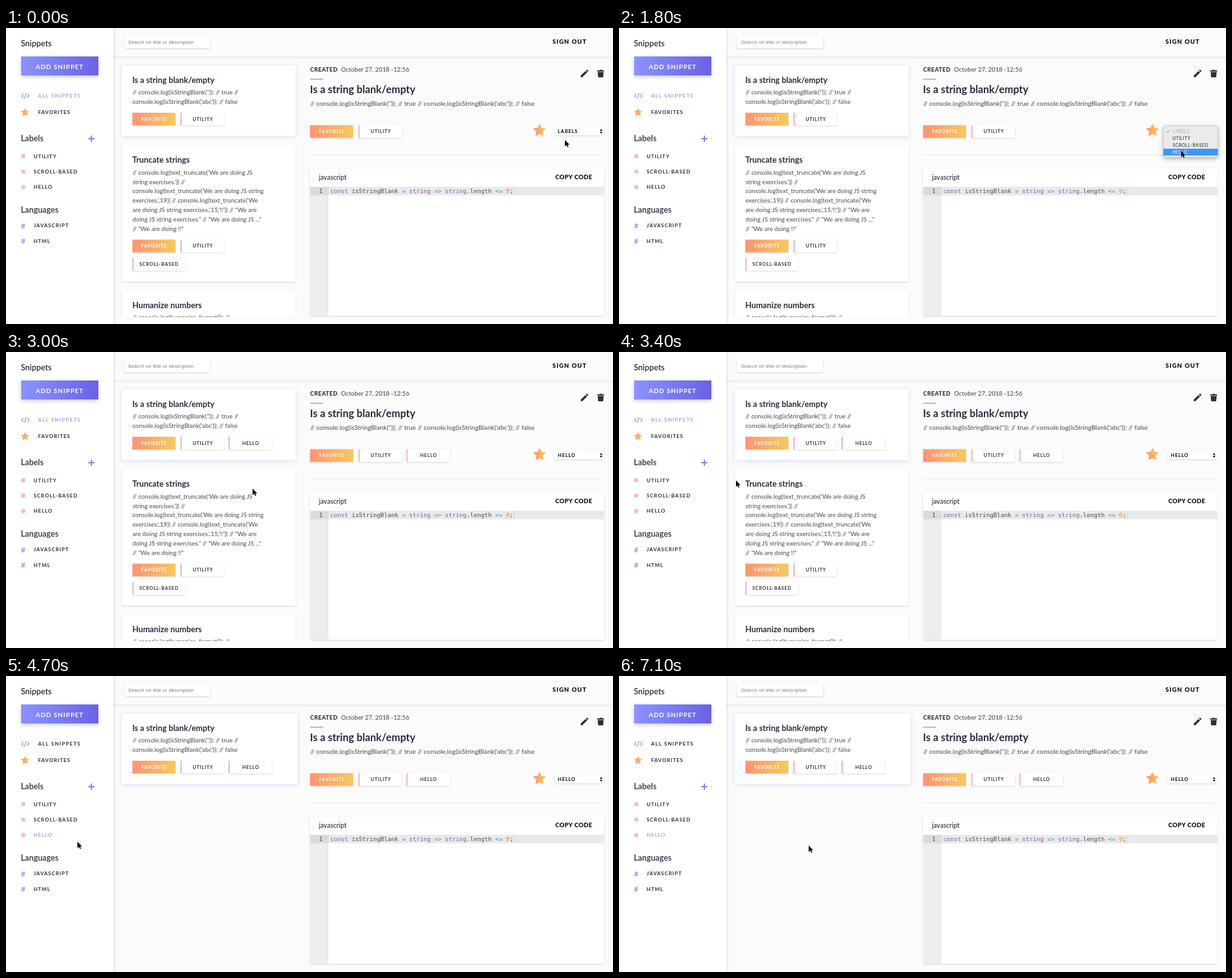
Write an HTML page that moves like this. It is 960 px wide and 468 px high and loops after 7200 ms.

```html
<!DOCTYPE html>
<html lang="en">
<head>
<meta charset="utf-8">
<title>Snippets</title>
<style>
html, body { margin: 0; width: 100%; height: 100%; overflow: hidden; background: #fbfbfb; }
svg { display: block; width: 100%; height: 100%; }
text { font-family: Lato, sans-serif; fill: #2c2b3f; white-space: pre; }

.head { font-size: 12.8px; font-weight: 600; }
.nav { font-size: 8px; font-weight: 700; letter-spacing: 1px; }
.nav.wide { letter-spacing: 1.3px; }
.hash { font-size: 12px; font-weight: 600; fill: #8d89f0; }
.add { font-size: 10px; font-weight: 700; letter-spacing: 1px; fill: #fff; }
.search { font: 7.6px "Liberation Sans", Arial, sans-serif; letter-spacing: .27px; fill: #757575; }
.act { font-size: 9.7px; font-weight: 800; letter-spacing: 1.05px; fill: #000; }
.copy { letter-spacing: .4px; }
.title { font-size: 12.8px; font-weight: 700; }
.title.big { font-size: 16.4px; }
.body { font-size: 9.75px; fill: #4a4a4f; }
.body.big { font-size: 10.3px; }
.tag { font-size: 7.1px; font-weight: 700; letter-spacing: .9px; }
.created { font-size: 9px; font-weight: 800; letter-spacing: .5px; }
.date { font-size: 9.8px; fill: #3d3d48; }
.lang { font-size: 10.5px; font-weight: 500; }
.code { font: 9.44px "DejaVu Sans Mono", monospace; fill: #4d4d4c; }
.kw { fill: #8959a8; }
.op { fill: #3e8fb0; }
.num { fill: #f5871f; }
.pick { font-size: 7.4px; font-weight: 700; letter-spacing: 1px; fill: #000; }
.item { font: 7px Inter, sans-serif; letter-spacing: .26px; fill: #222; }
.item.off { fill: #a5a5a5; }
.hot .item { fill: #fff; }
.hot rect { fill: #3d95f5; }
.white { fill: #fff; }

.soft { filter: drop-shadow(0 1px 1.5px rgba(0, 0, 0, .14)); }
.glow { filter: drop-shadow(0 1px 3px rgba(105, 100, 240, .24)); }
.lift { filter: drop-shadow(0 2px 3px rgba(60, 55, 130, .3)); }
.pane { filter: drop-shadow(0 0 2.5px rgba(0, 0, 0, .17)); }
.pop { filter: drop-shadow(0 2px 3px rgba(0, 0, 0, .3)); }

/* 7200 ms loop, redrawn in 100 ms steps */
.all, .mine, .first, .rest, .new, .before, .after, .menu, .row1, .row2, .row3 {
  animation: 7200ms step-end infinite;
}
.all { animation-name: all; }
.mine { animation-name: mine; }
.first { animation-name: widen; }
.rest { animation-name: rest; }
.new { animation-name: tagged; }
.before { animation-name: before; }
.after { animation-name: after; }
.menu { animation-name: menu; }
.row1 { animation-name: row1; }
.row2 { animation-name: row2; }
.row3 { animation-name: row3; }
@keyframes all { 0% { fill: #a29ff0; } 59.72%, 100% { fill: #2c2b3f; } }
@keyframes mine { 0% { fill: #2c2b3f; } 59.72%, 100% { fill: #a29ff0; } }
@keyframes widen { 0% { width: 275px; } 59.72%, 100% { width: 278px; } }
@keyframes rest { 0% { opacity: 1; } 59.72%, 100% { opacity: 0; } }
@keyframes tagged { 0% { opacity: 0; } 37.49%, 100% { opacity: 1; } }
@keyframes before { 0% { opacity: 1; } 36.11%, 100% { opacity: 0; } }
@keyframes after { 0% { opacity: 0; } 36.11%, 100% { opacity: 1; } }
@keyframes menu { 0% { opacity: 0; } 12.49% { opacity: 1; } 34.72% { opacity: .4; } 36.11%, 100% { opacity: 0; } }
@keyframes row1 { 0% { opacity: 0; } 18.05% { opacity: 1; } 20.83%, 100% { opacity: 0; } }
@keyframes row2 { 0% { opacity: 0; } 20.83% { opacity: 1; } 23.61%, 100% { opacity: 0; } }
@keyframes row3 { 0% { opacity: 0; } 23.61%, 100% { opacity: 1; } }

.cursor { animation: roam 7200ms infinite; }
@keyframes roam {
  0% { transform: translate(884px, 177px); animation-timing-function: steps(3); }
  4.16% { transform: translate(884px, 177px); animation-timing-function: steps(5); }
  11.11% { transform: translate(892px, 165px); animation-timing-function: steps(3); }
  15.27% { transform: translate(892px, 165px); animation-timing-function: steps(7); }
  24.99% { transform: translate(889px, 194px); animation-timing-function: steps(5); }
  31.94% { transform: translate(887px, 197px); animation-timing-function: steps(2); }
  34.72% { transform: translate(851px, 200px); animation-timing-function: steps(2); }
  37.49% { transform: translate(710px, 212px); animation-timing-function: steps(3); }
  41.66% { transform: translate(390px, 216px); animation-timing-function: steps(4); }
  47.22% { transform: translate(185px, 203px); animation-timing-function: steps(6); }
  55.55% { transform: translate(63px, 250px); animation-timing-function: steps(3); }
  59.72% { transform: translate(63px, 252px); animation-timing-function: steps(4); }
  65.27% { transform: translate(113px, 262px); animation-timing-function: steps(4); }
  70.83% { transform: translate(235px, 268px); animation-timing-function: steps(4); }
  76.38%, 100% { transform: translate(300px, 268px); }
}
</style>
</head>
<body>
<svg viewBox="0 0 960 468" preserveAspectRatio="none">
  <defs>
    <linearGradient id="violet"><stop stop-color="#8b93ff"/><stop offset="1" stop-color="#6a62e4"/></linearGradient>
    <linearGradient id="sun"><stop stop-color="#ff9376"/><stop offset="1" stop-color="#f6c95c"/></linearGradient>
    <clipPath id="list"><rect x="172" y="46" width="300" height="411"/></clipPath>
    <path id="star" d="M0-10 2.9-4 9.5-3.1 4.7 1.5 5.9 8.1 0 5-5.9 8.1-4.7 1.5-9.5-3.1-2.9-4Z" fill="url(#sun)" stroke="url(#sun)" stroke-linejoin="round"/>
    <g id="blank">
      <rect class="soft white" width="68.5" height="20"/>
      <rect width="2" height="20" fill="#f6b5c3"/>
    </g>
    <g id="favorite">
      <rect class="soft" width="68" height="20" fill="url(#sun)"/>
      <text class="tag white" x="14" y="12.7" style="fill:#fff">FAVORITE</text>
    </g>
    <g id="utility"><use href="#blank"/><text class="tag" x="19.3" y="12.7">UTILITY</text></g>
    <g id="hello"><use href="#blank"/><text class="tag" x="21.7" y="12.7">HELLO</text></g>
    <g id="field">
      <rect class="soft white" x="868" y="158" width="77.5" height="11.5"/>
      <path d="M939 162.6 941.2 159.8 943.4 162.6ZM939 164.2 941.2 167 943.4 164.2Z"/>
    </g>
  </defs>

  <rect width="960" height="468" fill="#fbfbfb"/>

  <!-- top bar -->
  <rect class="pane" x="165" y="-10" width="805" height="55" fill="#fbfbfb"/>
  <rect class="soft white" x="187" y="12" width="135.5" height="20"/>
  <text class="search" x="193" y="25">Search on title or description</text>
  <text class="act" x="864.3" y="25">SIGN OUT</text>

  <!-- sidebar -->
  <rect class="pane white" x="-10" y="-10" width="180" height="488"/>
  <text class="head" x="23.5" y="29.3">Snippets</text>
  <rect class="lift" x="24" y="45" width="122" height="30" fill="url(#violet)"/>
  <text class="add" x="47" y="64.6">ADD SNIPPET</text>
  <path d="M27.6 104.2 24.5 107.4 27.6 110.6M33.6 104.2 36.7 107.4 33.6 110.6M31.8 103 29.4 111.8" fill="none" stroke="#8d8bd8" stroke-width="1.1"/>
  <text class="nav wide all" x="50.7" y="110.2">ALL SNIPPETS</text>
  <use href="#star" transform="translate(30.3 133.5) scale(.64)"/>
  <text class="nav" x="50.7" y="136.1">FAVORITES</text>

  <text class="head" x="23.5" y="179.4">Labels</text>
  <path d="M130 175H140M135 170V180" stroke="#8683ee" stroke-width="2"/>
  <g fill="#f6bcc9">
    <circle cx="27.3" cy="202.7" r="3.4"/>
    <circle cx="27.3" cy="227.1" r="3.4"/>
    <circle cx="27.3" cy="251.5" r="3.4"/>
  </g>
  <text class="nav" x="43.7" y="205.7">UTILITY</text>
  <text class="nav" x="43.7" y="230.1">SCROLL-BASED</text>
  <text class="nav mine" x="43.7" y="254.4">HELLO</text>

  <text class="head" x="23.5" y="291.7">Languages</text>
  <text class="hash" x="23.7" y="316.6">#</text>
  <text class="nav" x="43.7" y="315.2">JAVASCRIPT</text>
  <text class="hash" x="23.7" y="341">#</text>
  <text class="nav" x="43.7" y="339.6">HTML</text>

  <!-- snippet list -->
  <g clip-path="url(#list)">
    <g class="rest">
      <rect class="soft white" x="183" y="185" width="275" height="216"/>
      <text class="title" x="199.7" y="212.8">Truncate strings</text>
      <text class="body">
        <tspan x="200" y="231.6">// console.log(text_truncate('We are doing JS</tspan>
        <tspan x="200" y="246.5">string exercises.')) //</tspan>
        <tspan x="200" y="261.4">console.log(text_truncate('We are doing JS string</tspan>
        <tspan x="200" y="276.3">exercises.',19)) // console.log(text_truncate('We</tspan>
        <tspan x="200" y="291.2">are doing JS string exercises.',15,'!!')) // "We are</tspan>
        <tspan x="200" y="306.1">doing JS string exercises." // "We are doing JS ..."</tspan>
        <tspan x="200" y="321">// "We are doing !!"</tspan>
      </text>
      <use href="#favorite" x="200" y="334.7"/>
      <use href="#utility" x="276" y="334.7"/>
      <rect class="soft white" x="200" y="363.5" width="83.5" height="20.3"/>
      <rect x="200" y="363.5" width="2" height="20.3" fill="#f6b5c3"/>
      <text class="tag" x="211" y="376.2">SCROLL-BASED</text>

      <rect class="soft white" x="183" y="415" width="275" height="60"/>
      <text class="title" x="199.7" y="442.8">Humanize numbers</text>
      <text class="body" x="200" y="461.2">// console.log(humanize_format()); //</text>
    </g>

    <rect class="glow white first" x="183" y="59" width="275" height="112"/>
    <text class="title" x="199.7" y="87.2">Is a string blank/empty</text>
    <text class="body" x="200" y="105.1">// console.log(isStringBlank('')); // true //</text>
    <text class="body" x="200" y="120">console.log(isStringBlank('abc')); // false</text>
    <use href="#favorite" x="200" y="134"/>
    <use href="#utility" x="276" y="134"/>
    <use class="new" href="#hello" x="352" y="134"/>
  </g>

  <!-- detail -->
  <text class="created" x="481" y="69">CREATED</text>
  <text class="date" x="529.7" y="69">October 27, 2018 -12:56</text>
  <rect x="481" y="80.3" width="21" height="1.4" fill="#9a98f0"/>
  <g fill="#2f2f2f">
    <path transform="translate(907 63.8) scale(.67)" d="M3 17.25V21h3.75L17.81 9.94l-3.75-3.75ZM20.71 7.04a1 1 0 0 0 0-1.41l-2.34-2.34a1 1 0 0 0-1.41 0l-1.83 1.83 3.75 3.75Z"/>
    <path d="M935 67H938.3L939 65.9H942L942.7 67H946V68.7H935ZM935.8 69.5H945.2L944.6 77Q944.5 78 943.5 78H937.5Q936.5 78 936.4 77Z"/>
  </g>
  <text class="title big" x="480.8" y="103.2">Is a string blank/empty</text>
  <text class="body big" x="481" y="123">// console.log(isStringBlank('')); // true // console.log(isStringBlank('abc')); // false</text>
  <use href="#favorite" x="481" y="153.7"/>
  <use href="#utility" x="557.5" y="153.7"/>
  <use class="new" href="#hello" x="633.3" y="153.7"/>
  <use href="#star" transform="translate(843.8 162.3)"/>
  <use href="#field"/>
  <text class="pick before" x="872.7" y="166">LABELS</text>
  <text class="pick after" x="872.7" y="166">HELLO</text>
  <rect x="481" y="200" width="464.5" height="1" fill="#e7e7e7"/>

  <!-- editor -->
  <rect class="soft white" x="481" y="222" width="465" height="233"/>
  <text class="lang" x="494.7" y="239.8">javascript</text>
  <text class="act copy" x="868.7" y="239">COPY CODE</text>
  <rect x="481.5" y="251" width="28.5" height="204" fill="#ededed"/>
  <rect x="481.5" y="251" width="28.5" height="13.5" fill="#dadada"/>
  <rect x="510" y="251" width="436" height="13.5" fill="#e9e9e9"/>
  <text class="code" x="495" y="261">1</text>
  <text class="code" x="512.7" y="261"><tspan class="kw">const</tspan> isStringBlank <tspan class="op">=</tspan> <tspan class="kw">string</tspan> <tspan class="op">=&gt;</tspan> <tspan class="kw">string</tspan>.length <tspan class="op">&lt;=</tspan> <tspan class="num">0</tspan>;</text>
  <rect x="803" y="251.5" width="1" height="12.5" fill="#d2d2d2"/>

  <!-- label menu -->
  <g class="menu">
    <rect class="pop" x="861" y="155" width="86" height="49.5" rx="3.5" fill="#ebebeb" stroke="#c6c6c6" stroke-width=".7"/>
    <path d="M865.5 163.8 867.3 166 870.5 161" fill="none" stroke="#999"/>
    <text class="item off" x="875.2" y="166.4">LABELS</text>
    <text class="item" x="875.2" y="177.2">UTILITY</text>
    <text class="item" x="875.2" y="188">SCROLL-BASED</text>
    <text class="item" x="875.2" y="198.8">HELLO</text>
    <g class="hot row1"><rect x="861" y="169.2" width="86" height="10.8"/><text class="item" x="875.2" y="177.2">UTILITY</text></g>
    <g class="hot row2"><rect x="861" y="180" width="86" height="10.8"/><text class="item" x="875.2" y="188">SCROLL-BASED</text></g>
    <g class="hot row3"><rect x="861" y="190.8" width="86" height="10.8"/><text class="item" x="875.2" y="198.8">HELLO</text></g>
  </g>

  <path class="cursor" d="M0 0V10.2L2.4 8.1 4 11.6 5.6 10.9 4.1 7.4H7.2Z" stroke="#fff" stroke-width=".8" paint-order="stroke"/>
</svg>
</body>
</html>
```
